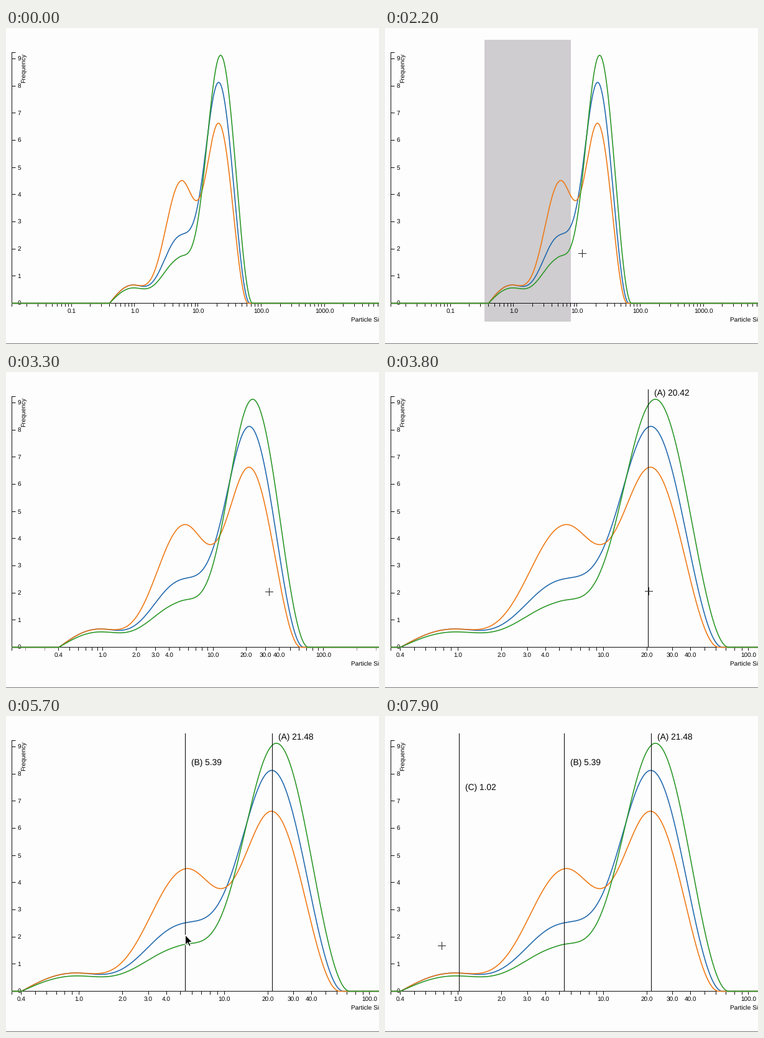
A matplotlib script that plays this animation: 600 by 508 pixels, repeating every 8000 ms.

```python
import numpy as np
import matplotlib.pyplot as plt
from matplotlib.animation import FuncAnimation
from matplotlib.patches import Polygon, Rectangle

W, H, DPI = 600, 508, 100
STEP, FRAMES = 100, 80
PX = 72 / DPI
LEFT, RIGHT, BASE, UNIT = 9.5, 613, 442.5, 43.65
WIDE = (206.9, 101.8)     # x of 1.0 and px per decade, whole range
CLOSE = (117.6, 233.55)   # the same after zooming in
BRUSH_AT, ZOOM_AT, ZOOM_MS = 1600, 2900, 760
LAG = 70                  # dragged things trail the pointer
INK = "#111111"

plt.rcParams["font.family"] = "Liberation Sans"
plt.rcParams["text.hinting"] = "none"

fig = plt.figure(figsize=(W / DPI, H / DPI), dpi=DPI, facecolor="#fefdfe")
ax = fig.add_axes([0, 0, 1, 1])
ax.set(xlim=(0, W), ylim=(H, 0))
ax.axis("off")


def line(xs, ys, color=INK, width=1.0, z=3):
    return ax.plot(xs, ys, color=color, lw=width * PX, zorder=z, snap=False,
                   solid_capstyle="butt", solid_joinstyle="round")[0]


def text(x, y, s, size=10, z=4, **kw):
    return ax.text(x, y, s, fontsize=size * PX, color="#000000", zorder=z,
                   va="baseline", clip_on=True, **kw)


def crisp(v):
    return np.floor(v) + 0.5


def ease(u):
    u = min(max(u, 0), 1)
    return 4 * u ** 3 if u < 0.5 else 1 - 4 * (1 - u) ** 3


def close_x(size):
    return CLOSE[0] + CLOSE[1] * np.log10(size)


# Curves: three modes each, shaped in zoomed-in pixels
def gauss(d, left, right):
    return np.exp(-0.5 * (d / np.where(d < 0, left, right)) ** 2)


def cosine(d, width):
    return np.cos(np.pi / 2 * np.clip(d / width, -1, 1))


def fine_mode(x, height):
    d = x - 105
    return height * np.where(d < 0, cosine(d, 80), gauss(d, 49, 49))


def middle_mode(x, height, center, left, right):
    return height * gauss(x - center, left, right)


def main_mode(x, height, center, left, fall):
    d = x - center
    return height * np.where(d < 0, gauss(d, left, left), cosine(d, fall) ** 2)


def curve(fine, middle, main):
    x = np.linspace(25, 570, 500)
    h = fine_mode(x, fine) + middle_mode(x, *middle) + main_mode(x, *main)
    h[0] = 0
    logs = (x - CLOSE[0]) / CLOSE[1]
    return np.r_[-3, logs, 5], BASE - np.r_[0, h, 0]


CURVES = [
    ("#1f68ad", 28, (103, 281, 59, 58), (351, 429, 51, 114)),
    ("#ee7813", 28, (193, 288, 57, 51), (285, 429, 48, 108)),
    ("#2a9726", 23, (68, 280, 63, 45), (398.5, 435, 53, 118)),
]
plots = []
for color, *modes in CURVES:
    logs, ys = curve(*modes)
    plots.append((logs, line(logs, ys, color, 1.6, 5)))

# Axes
line([LEFT + 6, LEFT, LEFT, LEFT + 6], [39.5, 39.5, BASE, BASE])
line([LEFT, LEFT, RIGHT], [448, BASE, BASE])
for n in range(10):
    y = BASE - n * UNIT
    line([LEFT, LEFT + 6], [crisp(y)] * 2)
    text(18.3, y + 3.2, str(n))
text(31, 41, "Frequency", rotation=90, rotation_mode="anchor", ha="right")
text(555, 472, "Particle Size (μm)")
ax.add_patch(Rectangle((0, 506.6), W, 1, fc="#7d737f", lw=0, zorder=1))

ticks = []
for dec in range(-2, 4):
    for m in range(1, 10):
        v = m * 10.0 ** dec
        if v > 0.0115:
            ticks.append((v, m, line([0, 0], [BASE, 448]),
                          text(0, 458.5, f"{v:.1f}", ha="center")))

brush = ax.add_patch(Rectangle((160, 19), 1, 453, fc="#cfcdcf", lw=0, zorder=2))

# Pointer path: time, x, y
A, B, C = close_x(21.48), close_x(5.39), close_x(1.016)
TIMES, XS, YS = np.array([
    (900, 112, 515), (1500, 160, 371), (BRUSH_AT, 160, 370), (2200, 317, 362.5),
    (2700, 423, 353.5), (3700, 423, 353.5), (4000, A, 350), (4500, 337.1, 346),
    (4700, 330, 345.5), (5400, B, 352), (6000, B, 352), (6550, 136, 366),
    (7050, C, 368), (7800, 91.5, 369.5)]).T


def pointer(t):
    return np.interp(t, TIMES, XS), np.interp(t, TIMES, YS)


cross = [line([0, 0], [0, 0], "#333333", 1.1, 8) for _ in range(2)]
ARROW = np.array([(0, 0), (0, 16), (3.7, 12.6), (6.3, 18.3), (8.7, 17.2),
                  (6.2, 11.6), (11, 11.3)])
arrow = ax.add_patch(Polygon(ARROW, fc="black", ec="white", lw=PX, zorder=9))

# Markers: letter, drag start, drag end
markers = [(name, t0, t1, line([0, 0], [28, BASE], INK, 1.1, 6),
            text(0, 38.5 + 40.4 * row, "", 13.8, 7))
           for row, (name, t0, t1) in enumerate(
               [("A", 3700, 4000), ("B", 4500, 5400), ("C", 6550, 7050)])]


def update(i):
    t = i * STEP
    k = ease((t - ZOOM_AT) / ZOOM_MS)
    zoomed = t >= ZOOM_AT
    x0, scale = (a + (b - a) * k for a, b in zip(WIDE, CLOSE))

    for logs, plot in plots:
        plot.set_xdata(np.maximum(x0 + scale * logs, LEFT))

    for v, m, mark, label in ticks:
        x = x0 + scale * np.log10(v)
        kept = LEFT <= close_x(v) <= RIGHT
        mark.set_xdata([crisp(x)] * 2)
        label.set_x(x)
        for part in (mark, label):
            part.set_alpha(1 if kept else 1 - k)
        label.set_visible(m == 1 or (zoomed and kept and m <= 4))

    brush.set_visible(BRUSH_AT < t < ZOOM_AT)
    brush.set_width(max(pointer(t - LAG)[0] - 160, 0))

    for name, t0, t1, rule, label in markers:
        x = pointer(np.clip(t - LAG, t0, t1))[0]
        size = 10 ** ((x - CLOSE[0]) / CLOSE[1])
        rule.set_xdata([crisp(x)] * 2)
        label.set_x(x + 9.4)
        label.set_text(f"({name}) {size:.2f}")
        for part in (rule, label):
            part.set_visible(t >= t0)

    px, py = pointer(t)
    is_arrow = 5400 <= t <= 6000 or py > 472
    arrow.set_xy(ARROW + (px, py))
    arrow.set_visible(t >= 900 and is_arrow)
    cx, cy = crisp(px), crisp(py)
    cross[0].set_data([cx - 6.5, cx + 6.5], [cy, cy])
    cross[1].set_data([cx, cx], [cy - 6.5, cy + 6.5])
    for c in cross:
        c.set_visible(t >= 900 and not is_arrow)
    return []


anim = FuncAnimation(fig, update, frames=FRAMES, interval=STEP,
                     init_func=lambda: update(0), repeat=True, repeat_delay=0)
plt.show()
```
